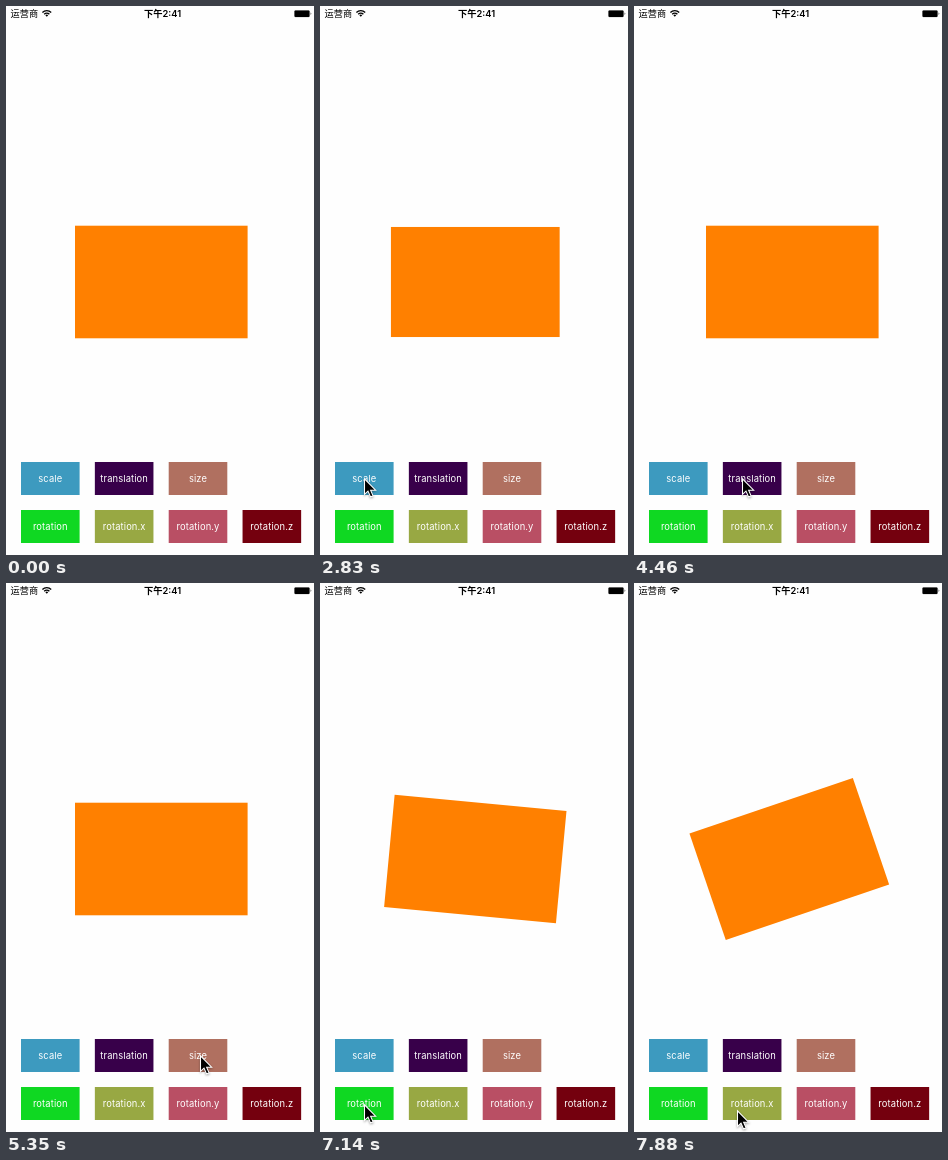
Write an HTML page that moves like this. It is 308 by 549 pixels and loops after 8 s.

```html
<!DOCTYPE html>
<html lang="zh">
<head>
<meta charset="utf-8">
<title>Layer animations</title>
<style>
  html, body { margin: 0; width: 100%; height: 100%; overflow: hidden; background: #fefefe; }
  svg { display: block; width: 100%; height: 100%; }
  text { font-family: Inter, "Noto Sans CJK SC", "Noto Sans CJK", sans-serif; }
  #buttons text { font-size: 9.4px; letter-spacing: .12px; fill: #fff; text-anchor: middle; }
  #cursor { filter: drop-shadow(0 1px 1px rgba(0, 0, 0, .35)); }
</style>
</head>
<body>
<svg viewBox="0 0 308 549">
  <g id="status">
    <text x="4.6" y="11" font-size="9.2">运营商</text>
    <g fill="none" stroke="#000" stroke-width="1.3">
      <path d="M36.4 6.5a6.2 6.2 0 0 1 8.8 0M38.2 8.3a3.7 3.7 0 0 1 5.2 0"/>
      <path d="M39.4 9.2a2 2 0 0 1 2.8 0L40.8 10.8z" fill="#000" stroke="none"/>
    </g>
    <text x="156.5" y="11" font-size="9.3" font-weight="600" text-anchor="middle">下午2:41</text>
    <rect x="288.5" y="4.5" width="15" height="6.4" rx="1" stroke="#000" stroke-opacity=".4" stroke-width=".6"/>
    <path d="M304.7 6.2q1.3 1.4 0 2.8z"/>
  </g>
  <rect id="box" fill="#ff8000"/>
  <g id="buttons"></g>
  <path id="cursor" d="M0 0v14.6l3.3-3.1 2.4 5.5 2.4-1-2.3-5.3h4.7z" stroke="#fff"/>
</svg>
<script>
const LOOP = 8000, TICK = 148.6;
const CENTER = { x: 155.3, y: 276 };
const FULL = { width: 172.6, height: 112.6 };
const SMALL = { width: 65.7, height: 41 };

const rows = [
  { scale: "#3d9abf", translation: "#38004a", size: "#b07060" },
  { rotation: "#0fd822", "rotation.x": "#98a843", "rotation.y": "#b94f64", "rotation.z": "#74000e" }
];
document.getElementById("buttons").innerHTML = rows.map((row, r) =>
  Object.entries(row).map(([label, color], col) => {
    const x = 15 + col * 73.85, y = 456 + r * 48;
    return `<rect x="${x}" y="${y}" width="58.6" height="33" fill="${color}"/>
            <text x="${x + 29.3}" y="${y + 20}">${label}</text>`;
  }).join("")).join("");

// Pointer trips between buttons; start and end are in ticks.
const home = { x: 276, y: 458 };
const trips = [
  { start: 7, end: 12, x: 44, y: 472 },
  { start: 23, end: 25, x: 108, y: 472 },
  { start: 34, end: 36, x: 194, y: 472 },
  { start: 43, end: 47, x: 44, y: 521 },
  { start: 51, end: 53, x: 103, y: 527 }
];

const mix = (a, b, p) => a + (b - a) * p;
const smooth = p => p * p * (3 - 2 * p);

// Linear progress inside the span; outside it the layer snaps back to rest.
function progress(tick, start, end) {
  const p = (tick - start) / (end - start);
  return p >= 0 && p <= 1 ? p : 0;
}

// Each trip eases in and out and bows slightly upward.
function pointerAt(tick) {
  let from = home;
  for (const trip of trips) {
    if (tick < trip.start) break;
    const p = smooth(Math.min(1, (tick - trip.start) / (trip.end - trip.start)));
    const bow = .06 * Math.abs(trip.x - from.x) * Math.sin(Math.PI * p);
    from = { x: mix(from.x, trip.x, p), y: mix(from.y, trip.y, p) - bow };
  }
  return from;
}

const box = document.getElementById("box");
const cursor = document.getElementById("cursor");

function draw(time) {
  const tick = Math.floor((time % LOOP + 4) / TICK);
  const scale = 1 - .5 * progress(tick, 18.76, 24.1);
  const shift = 38 * progress(tick, 29.57, 35.02);
  const resize = progress(tick, 37.62, 43);
  const spin = 360 * progress(tick, 47.92, 53.28);
  const width = mix(FULL.width, SMALL.width, resize) * scale;
  const height = mix(FULL.height, SMALL.height, resize) * scale;

  box.setAttribute("x", -width / 2);
  box.setAttribute("y", -height / 2);
  box.setAttribute("width", width);
  box.setAttribute("height", height);
  box.setAttribute("transform", `translate(${CENTER.x + shift} ${CENTER.y}) rotate(${spin})`);

  const { x, y } = pointerAt(tick);
  cursor.setAttribute("transform", `translate(${x + .5} ${y + .9}) scale(1.06)`);
  cursor.setAttribute("visibility", tick < 4 ? "hidden" : "visible");
}

const start = performance.now();
function frame() {
  draw(performance.now() - start);
  requestAnimationFrame(frame);
}
frame();
</script>
</body>
</html>
```
